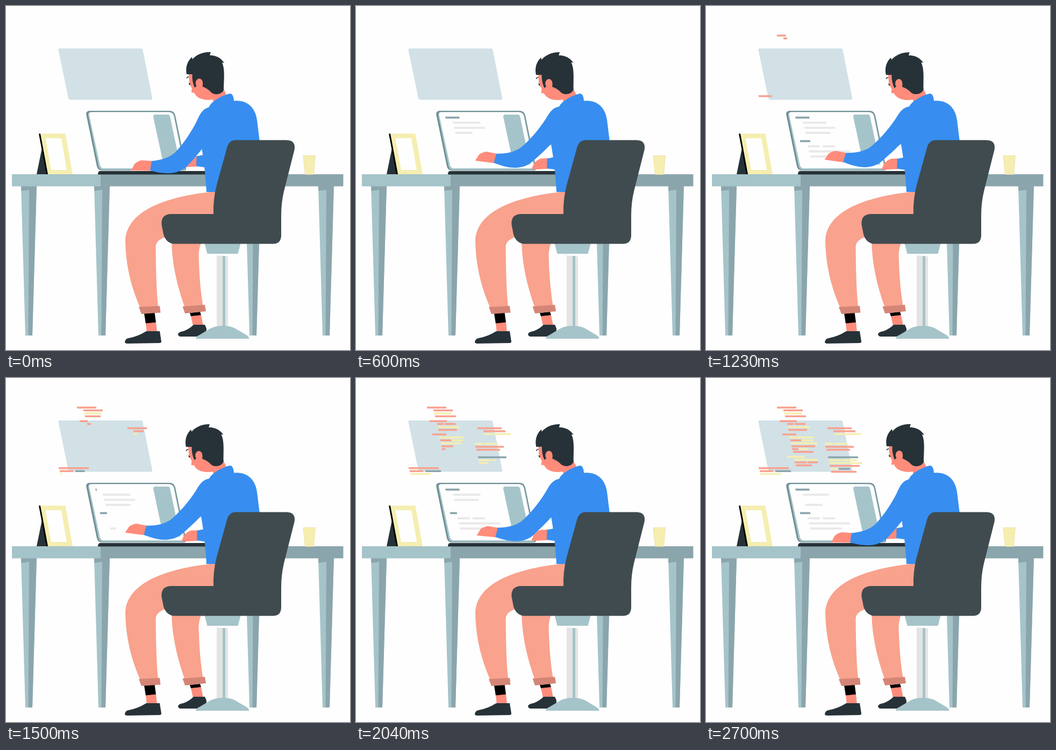
Recreate the animation shown at these times as an HTML page with a canvas. Size 640x640 px, loop 2730 ms.

```html
<!DOCTYPE html>
<html lang="en">
<head>
<meta charset="utf-8">
<title>Working at a desk</title>
<style>
  html, body { margin: 0; width: 100%; height: 100%; overflow: hidden; background: #fefefe; }
  canvas { display: block; }
</style>
</head>
<body>
<canvas id="stage" width="640" height="640"></canvas>
<script>
const ctx = document.getElementById('stage').getContext('2d');
const LOOP = 2730, STEP = 30, SWING = 900;
const SLANT = 0.2;

const C = {
  paper: '#fefefe', blue: '#378ef0', skin: '#ff8b7b', pants: '#f9a28d', cuff: '#d48576',
  dark: '#263238', chair: '#404b4f', teal: '#a5c4c9', shade: '#8ba5ac', panel: '#d1e1e6',
  yellow: '#f5eeb0', grey: '#e9e9e9', bezel: '#6f8e94', salmon: '#f8a18f', black: '#000'
};

const clamp = v => Math.max(0, Math.min(1, v));
const easeInOut = u => u < 0.5 ? 2 * u * u : 1 - 2 * (1 - u) ** 2;

function shape(d, color) {
  ctx.fillStyle = color;
  ctx.fill(new Path2D(d));
}

function rect(x, y, w, h, color) {
  ctx.fillStyle = color;
  ctx.fillRect(x, y, w, h);
}

function turned(x, y, degrees, draw) {
  ctx.save();
  ctx.translate(x, y);
  ctx.rotate(degrees * Math.PI / 180);
  ctx.translate(-x, -y);
  draw();
  ctx.restore();
}

// A slanted bar centred vertically on y
function bar(x, y, w, h, color) {
  if (w <= 0) return;
  const k = SLANT * h / 2;
  ctx.fillStyle = color;
  ctx.beginPath();
  ctx.moveTo(x - k, y - h / 2);
  ctx.lineTo(x + w - k, y - h / 2);
  ctx.lineTo(x + w + k, y + h / 2);
  ctx.lineTo(x + k, y + h / 2);
  ctx.fill();
}

// Pieces are [from, to, colour]; the row is uncovered from left to right
function row(y, pieces, p, h) {
  const first = pieces[0][0], last = pieces[pieces.length - 1][1];
  const edge = first + (last - first) * p;
  for (const [from, to, color] of pieces) bar(from, y, Math.min(to, edge) - from, h, C[color]);
}

const screenRows = [
  { y: 207.7, pieces: [[166.5, 192.5, 'shade']], starts: [30, 1470, 2304] },
  { y: 217.2, pieces: [[180, 231.5, 'grey']], starts: [230, 950, 1670, 2390] },
  { y: 226.6, pieces: [[182.5, 240.5, 'grey']], starts: [260, 780, 1780, 2700] },
  { y: 236, pieces: [[185, 231.5, 'grey']], starts: [375, 2040, 2475] },
  { y: 251.4, pieces: [[175, 194, 'shade']], starts: [600, 1276, 1816] },
  { y: 261, pieces: [[189, 212, 'grey'], [217, 240, 'grey']], starts: [600, 1500] },
  { y: 270.5, pieces: [[191.5, 268, 'grey']], starts: [640, 1500] },
  { y: 280, pieces: [[194, 253, 'grey']], starts: [650, 1440] }
];

const S = 'salmon', Y = 'yellow', T = 'shade';
const codeBlocks = [
  { start: 1114, gap: 67, rows: [
    [55, [132, 168, S]], [60.3, [144, 180, S]], [65.8, [145, 178, Y]], [71.2, [147, 186, S]],
    [80.2, [137, 169, S]], [85.6, [151, 163, S], [165, 185, S]], [91.3, [153, 193, Y]],
    [96.5, [153, 188, S]], [105, [142, 168, S]], [110.5, [155, 200, Y]],
    [116, [157, 177, S], [178, 199, Y]], [121.6, [158, 207, Y]], [127, [159, 203, S]],
    [132.2, [160, 172, S], [173, 189, Y]], [137.6, [162, 200, S]], [146.5, [151, 183, Y]],
    [152, [164, 208, Y]], [157, [165, 187, S], [189, 208, S]], [162.5, [167, 197, S]]
  ] },
  { start: 1300, gap: 84, rows: [
    [93.5, [226, 271, S]], [98.9, [237, 278, S]], [104.3, [238, 288, Y]],
    [122.6, [221, 237, Y], [239, 264, Y]], [128, [222, 275, S]], [133.5, [224, 268, S]],
    [147.5, [227, 283, T]], [153, [228, 252, Y], [254, 281, Y]], [158.2, [229, 290, Y]],
    [163.6, [230, 286, S]], [169, [232, 245, Y], [247, 268, T]], [174.4, [233, 280, S]]
  ] },
  { start: 1120, gap: 180, rows: [
    [167.7, [98, 154, S]], [173.2, [100, 125, S], [129, 158, T]], [178.6, [101, 139, Y]]
  ] }
];

function hologram(t) {
  shape('M100 79 H251 Q254 79 254.500 82 L272 171 Q273 174 270 174.500 H120 Q117 174.500 116 171.500 L97.500 82 Q97 79 100 79Z', C.panel);
  for (const { start, gap, rows } of codeBlocks) {
    rows.forEach(([y, ...pieces], i) => row(y, pieces, clamp((t - start - i * gap) / 250), 3.5));
  }
}

function laptop(t) {
  shape('M156 195 H304 Q313 195 315 204 L335 301 Q336 306 330 306 H179 Q171 306 169 298 L149.500 203 Q148 195 156 195Z', C.bezel);
  shape('M158 197 H303 Q311 197 313 204 L333 300 Q334 305 329 305 H180 Q174 305 172 298 L153 204 Q152 197 158 197Z', C.teal);
  shape('M159 197.500 H302 Q310 197.500 312 204 L331 298 Q332 302 328 302 H182 Q177 302 175 297 L155 204 Q153 197.500 159 197.500Z', C.paper);
  shape('M277 202 H302 Q304 202 305 205 L324 295 H293 L274 206 Q274 202 277 202Z', C.teal);
  for (const { y, pieces, starts } of screenRows) {
    const begun = starts.filter(s => s <= t).pop();
    if (begun !== undefined) row(y, pieces, clamp((t - begun) / 330), 3.8);
  }
}

function deskLeg(x) {
  ctx.save();
  ctx.translate(x, 0);
  shape('M0 335 H29 L21 613 H8Z', C.teal);
  shape('M0 335 H29 L21 613 H13.500 L15 342 L.3 344Z', C.shade);
  ctx.restore();
}

function desk() {
  [28, 164, 445, 581].forEach(deskLeg);
  rect(11, 313, 165, 22.5, C.teal);
  rect(176, 313, 451.5, 22.5, C.shade);
}

function deskItems() {
  shape('M67 264 L57 313 H91 L78 309Z', C.dark);
  shape('M61 237.500 H64.500 L79 313 H75Z', C.black);
  shape('M64 237.500 H110.500 L124 313 H78Z', C.yellow);
  shape('M73.500 246 H103 L113 305 H84Z', C.paper);
  shape('M552.500 278 H576 L573 313.500 H556Z', '#f2dfaa');
  shape('M553.500 279 H575 L572 313.500 H557Z', C.yellow);
  shape('M175 307 H371 V313.500 H171 Q171 307 175 307Z', C.dark);
}

function legs() {
  shape('M342 571 L361 569 L363 575.500 L344 577.500Z', C.black);
  shape('M344 577 L363 575 L367 595 H348Z', C.skin);
  shape('M320 610 Q322 606 330 605 Q341 601 349 593 H370 L373 600 L372 615 H324 Q320 614 320 610Z', C.dark);
  shape('M308 438 C309 480 318 520 333 562 L367 560 C360 520 359 480 358.500 462 Q359 450 364 438Z', C.pants);
  shape('M328.500 559 L370 556 L372 568 L333 572Z', C.cuff);

  shape('M257 572 L276.500 570 L279 589 L260 591Z', C.black);
  shape('M260 590.500 L279 588.500 L281 607 H262Z', C.skin);
  shape('M221 625 Q222 619 228 618 Q245 615 261 605 H286 L289 624 Q289 627 286 627 L226 628 Q221 628 221 625Z', C.dark);
  shape('M392 345 C330 350 224 370 222 437 C223 490 236 530 250 562 L283 560 C279 520 279 480 278.500 447 Q280 434 300 429 L392 400Z', C.pants);
  shape('M247 560 L286 558 L287.500 570.500 L252 573Z', C.cuff);
}

function head() {
  shape('M383 160 L404 152 L411 168 L386 182Z', C.skin);
  shape('M340 126 L341 143 L346 154 Q344 161 346 161.500 L350 161 C353 170 366 177 385 174 L392 150 L372 126Z', C.skin);
  shape('M336 127 C333 112 339 101 346 95 L347 99 C355 90 368 85 381 86 L379 91.500 C392 92 400 97 406 106 L402 105 C408 118 405 138 405 156 C402 164 390 167 382 161 Q376 154 366 150 L355 148 L351 152 Q346 141 346.500 127Z', C.dark);
  shape('M353 146 C352 140 355 135 360 135 C366 136 367 143 365.500 150 L358 154Z', C.skin);
  shape('M335.500 134 Q337 131 340 131 L340 132.500 Q338 132.500 336 135Z', C.dark);
  shape('M340 143 Q340 147 343 147.500 L342.500 144Z', C.dark);
}

function farArm(lift) {
  ctx.save();
  ctx.translate(1.5 * lift, 5.5 * lift);
  shape('M325.500 299 L329 291 Q334 282 343 279.500 L356 279 V298.500 L330 300Z', C.skin);
  shape('M354.500 279.500 L372 276 L376 301 L354 298Z', C.blue);
  ctx.restore();
}

function torso() {
  shape('M378 188 C380 179 402 166 416 163 Q423 162 424 176.500 C450 174 464 190 467 212 L473 260 L460 346 H373 C371 310 367 280 363 258 L358 215 Q362 195 378 188Z', C.blue);
}

function nearArm() {
  shape('M233 306 L239 294 Q244 289 252 287 L273 288.500 L270 306.500Z', C.skin);
  shape('M379 188 C366 191 361 200 355 214 C343 238 327 260 314 273 C302 283 287 287 271 288.500 L268 306 C300 315 321 312 336 299 C350 284 361 271 366 264 L400 230 L405 195Z', C.blue);
}

function chair() {
  shape('M369 440 H437 L431.500 461 H374.500Z', C.teal);
  shape('M392 464 L413 466 V598 H392Z', '#e3e4e3');
  rect(403, 465, 5, 133, C.teal);
  shape('M353 619 Q354 614 360 612 L380 600 Q390 595 403 595 Q416 595 425 599 L447 612 Q452 615 452.500 619Z', C.teal);
  shape('M427 249.500 H522 Q540 250 536.500 268 L517 345 Q512 366 512 390 V428 Q511 442.500 497 442.500 H312 Q298 441 293 425 L289.500 407 Q288 388 306 387 H386 Q385 360 392 333 L411 264 Q415 249.500 427 249.500Z', C.chair);
}

function draw(t) {
  rect(0, 0, 640, 640, C.paper);
  const phase = t % SWING / SWING;
  const lift = easeInOut(1 - Math.abs(2 * phase - 1));

  hologram(t);
  laptop(t);
  desk();
  deskItems();
  legs();
  farArm(lift);
  turned(388, 172, -1.7 * lift, head);
  torso();
  turned(390, 195, 8.2 * lift, nearArm);
  chair();
}

function tick() {
  const t = performance.now() % LOOP;
  draw(Math.floor(t / STEP) * STEP);
  requestAnimationFrame(tick);
}
tick();
</script>
</body>
</html>
```
